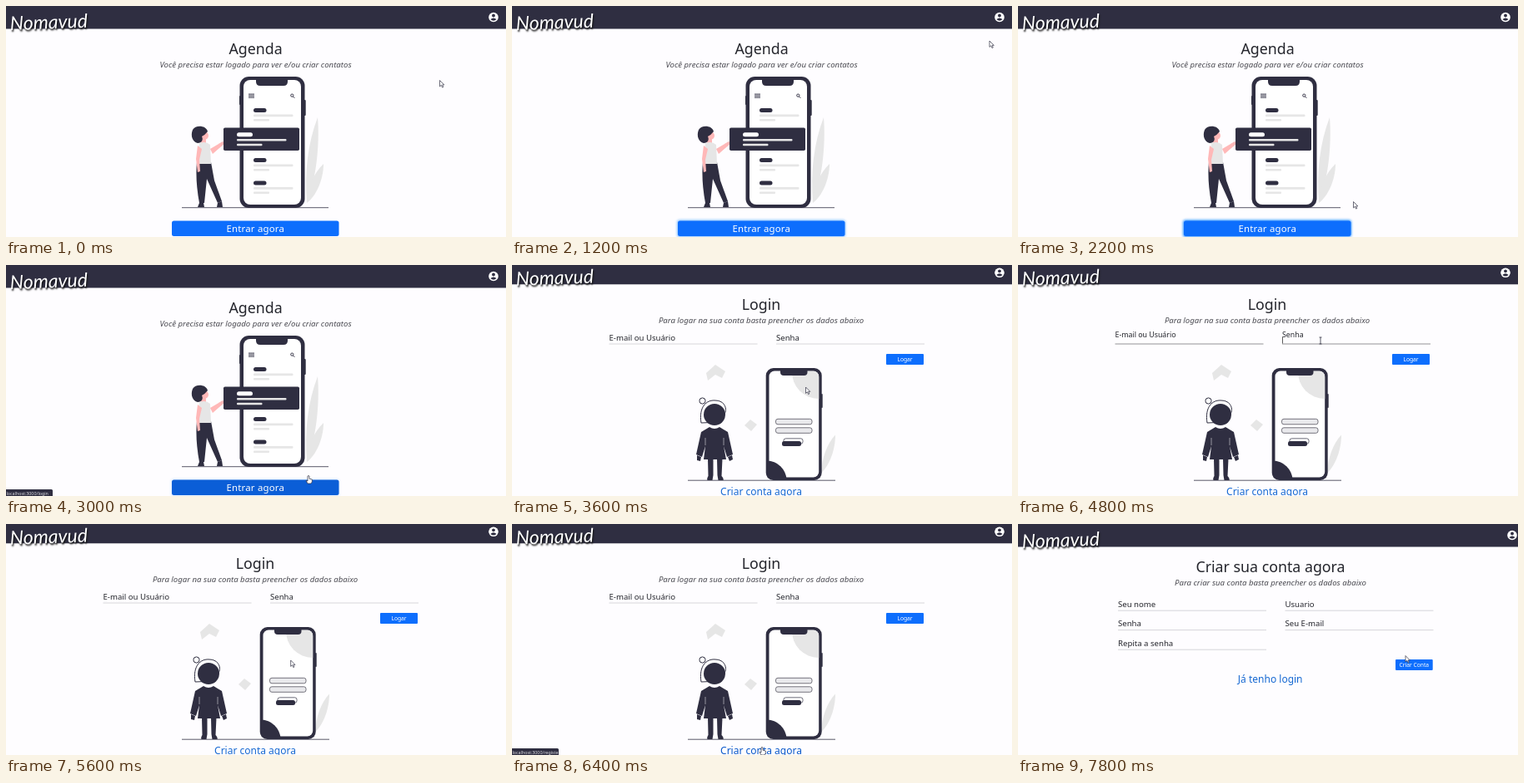
Recreate the animation shown at these times as an HTML page. Size 600 px wide and 278 px high, loop 8 s.

```html
<!DOCTYPE html>
<html lang="pt-BR">
<head>
<meta charset="utf-8">
<style>
  html, body { margin: 0; width: 100%; height: 100%; overflow: hidden; background: #fefdff; }
  svg { display: block; width: 100vw; height: 100vh; }
  text { font-family: "Noto Sans", "Open Sans", sans-serif; fill: #24252c; }
  .mid { text-anchor: middle; }
  .title { font-size: 17.8px; font-weight: 500; }
  .sub { font-size: 9.6px; font-style: italic; fill: #4b4b52; }
  .label { font-size: 9.6px; }
  .link { font-size: 12px; fill: #1769d2; }
  .small { font-size: 6.7px; fill: #fff; }
  .logo { font: italic 23px Lato, sans-serif; fill: #fff; text-shadow: 1px 2px 2px #111; }
  .dark { fill: #2f2e41; }
  .pale { fill: #e6e6e6; }
  .skin { fill: #ffb8b8; }
  .white { fill: #fff; }
  .blue { fill: #0d6efd; }
  .ink { fill: none; stroke: #2f2e41; }
</style>
</head>
<body>
<svg id="stage" viewBox="0 0 600 278" preserveAspectRatio="none"></svg>
<script>
const LOOP = 8000, STEP = 200;
const LOGIN_AT = 3400, REGISTER_AT = 7000;

const rect = (x, y, w, h, cls, r = 0) =>
  `<rect x="${x}" y="${y}" width="${w}" height="${h}" rx="${r}" class="${cls}"/>`;
const path = (d, cls, extra = '') => `<path d="${d}" class="${cls}" ${extra}/>`;
const circle = (x, y, r, cls) => `<circle cx="${x}" cy="${y}" r="${r}" class="${cls}"/>`;
const text = (x, y, cls, str, extra = '') => `<text x="${x}" y="${y}" class="${cls}" ${extra}>${str}</text>`;
const field = (id, x, y, str) =>
  `<g id="${id}">${text(x, y - 4.3, 'label', str)}` +
  `<line x1="${x}" x2="${x + 178}" y1="${y}" y2="${y}" stroke="#d2d2d6" stroke-width=".9"/></g>`;
const heading = (x, y, title, sub) =>
  text(x, y, 'title mid', title) + text(x, y + 16, 'sub mid', sub);

const leaf = (x, y) => `<g transform="translate(${x} ${y})">` +
  path('M0 0C-3-35 1-72 13-103C16-68 10-24 0 0Z', 'pale') +
  path('M0 0C1-18 8-36 20-47C20-28 11-8 0 0Z', 'pale') + '</g>';

const listItem = y => rect(297, y, 15.5, 5, 'dark', 2.5) +
  rect(297, y + 7.5, 47.5, 2.7, 'pale', 1) + rect(297, y + 13, 19, 2.5, 'pale', 1);

const woman =
  path('M229 188L246 188L250 210L259 235L254 237L241 208L238 237L232 237Q227 210 229 188Z', 'dark') +
  path('M232 237h5l1 5h-8ZM254 237l5-2l1 7h-7Z', 'dark') +
  path('M234 160h6v6h-6Z', 'skin') +
  path('M232 165Q240 162 245 167L246 190H229Q231 177 232 165Z', 'pale') +
  path('M230 168L228 184L230 200L233 199L232 185L235 172Z', 'skin') +
  path('M245 172L260 163L263 165L248 178Z', 'skin') +
  circle(238, 156, 5, 'skin') +
  path('M242 151C240 143 227 143 224 149C221 156 224 164 230 165C235 165 237 161 235 157Q239 155 242 151Z', 'dark');

const home =
  heading(299.5, 58, 'Agenda', 'Você precisa estar logado para ver e/ou criar contatos') +
  leaf(361, 237) +
  rect(357, 113, 2.7, 19, 'dark', 1) + rect(280, 108, 2, 11, 'dark', 1) +
  rect(280.5, 85, 78, 158, 'dark', 11) + rect(285, 89, 69, 150, 'white', 8) +
  path('M300 88H338V91Q338 96 333 96H305Q300 96 300 91Z', 'dark') +
  [106, 108, 110].map(y => rect(291, y - .4, 7, 1, 'dark')).join('') +
  `<circle cx="343.3" cy="107.6" r="1.6" class="ink"/>` + path('M344.5 109l1.8 1.8', 'ink') +
  [123, 183, 210.5].map(listItem).join('') +
  path('M211 242.7H387', 'ink', 'stroke-width=".8"') + woman +
  rect(261, 146.5, 91, 27.5, 'dark', 1.8) +
  rect(277, 152.3, 19, 5, 'white', 2.5) + rect(277, 160, 59.5, 2.5, 'pale', 1) +
  rect(277, 165.7, 30.5, 2.5, 'pale', 1) +
  `<rect id="glow" x="198" y="257.5" width="202" height="20.5" rx="3" fill="#0d83ff" filter="url(#blur)"/>` +
  `<rect id="enter" x="199" y="258.5" width="200.5" height="18.5" rx="2.5"/>` +
  text(299.3, 272, 'mid white', 'Entrar agora', 'style="font-size:11.4px;letter-spacing:.2px;fill:#fff"');

const girl =
  path('M227 190C224 171 233 162 244 163C253 163 258 170 256 177L251 189Z', 'white ink',
    'style="fill:#fff" stroke-width="1"') +
  `<circle cx="228.5" cy="163.5" r="3.6" fill="#fff" stroke="#2f2e41"/>` +
  circle(243, 180, 13, 'dark') +
  path('M237 195Q243 199 249 195L259 201L265 228L258 231L254 218L257 234H230L232 218L228 231L221 228L227 201Z', 'dark') +
  path('M222 229l5 2l-1 5l-4-1ZM259 231l5-2l1 5l-4 2Z', 'dark') +
  path('M235 233h6.5v20l-1 6h-6q-1-2 1-5ZM246 233h6.5l-1 21q3 3 2 5h-6l-1-6Z', 'dark') +
  path('M232 208v9M254 208v9', '', 'stroke="#fff" stroke-width=".5"');

const login =
  heading(299, 53.7, 'Login', 'Para logar na sua conta basta preencher os dados abaixo') +
  field('email', 116.5, 95, 'E-mail ou Usuário') + field('pass', 317, 95, 'Senha') +
  `<path id="caret" d="M317.5 86.5v8" stroke="#333" stroke-width=".8"/>` +
  rect(449, 107, 45, 13, 'blue', 1) + text(471.5, 116, 'small mid', 'Logar') +
  path('M233 130L244 120L256 128L252 136L244 132L235 139Z', 'pale') +
  path('M279 193L286 186L294 192L287 200Z', 'pale') +
  `<g transform="translate(371 250) scale(.85 .97)">${path('M0 0C1-18 8-36 20-47C20-28 11-8 0 0Z', 'pale')}</g>` +
  rect(371, 155, 1.7, 17, 'dark', .8) +
  rect(304.7, 124, 67, 135, 'dark', 9) + rect(308.5, 127.5, 59.7, 128, 'white', 6.5) +
  path('M336 128H361Q368.2 128 368.2 135V161A32 32 0 0 1 336 128Z', 'pale') +
  path('M322 127H354.5V129Q354.5 133 350.5 133H326Q322 133 322 129Z', 'dark') +
  path('M306 235.5A24 24 0 0 1 329.5 258H312Q306 258 306 250Z', 'dark') +
  [185.3, 195.8].map(y => `<rect x="316.5" y="${y}" width="43.5" height="6.5" rx="2.5" fill="#e9e9ec" stroke="#55545f" stroke-width=".8"/>`).join('') +
  rect(324, 212, 23, 6, 'dark', 2.5) +
  `<rect x="326" y="208.8" width="23" height="6.4" rx="2.5" class="ink" stroke-width=".7"/>` +
  path('M211 259.2H388', 'ink', 'stroke-width=".8"') + girl +
  text(299, 277, 'link mid', 'Criar conta agora', 'id="signup"');

const register =
  heading(303, 58, 'Criar sua conta agora', 'Para criar sua conta basta preencher os dados abaixo') +
  field('r1', 120, 104.2, 'Seu nome') + field('r2', 320.5, 104.2, 'Usuario') +
  field('r3', 120, 127.6, 'Senha') + field('r4', 320.5, 127.6, 'Seu E-mail') +
  field('r5', 120, 151.2, 'Repita a senha') +
  rect(453, 163, 44.7, 13, 'blue', 1) + text(475.3, 172, 'small mid', 'Criar Conta') +
  text(302.7, 191, 'link mid', 'Já tenho login');

const header = rect(0, -6, 600, 33.5, 'dark') +
  text(5, 29, 'logo', 'Nomavud', 'transform="rotate(-2 5 29)"') +
  `<g id="account">${circle(0, 0, 5.8, 'white')}${circle(0, -2, 1.9, 'dark')}` +
  `${path('M-3.6 2.6Q0-.8 3.6 2.6Q0 6 -3.6 2.6Z', 'dark')}</g>`;

const pointers = {
  arrow: path('M0 0V7.4L1.8 5.8L3.1 8.6L4.3 8L3.1 5.4H5.3Z', 'white ink', 'style="fill:#fff" stroke-width=".7"'),
  beam: path('M-1.5-4H1.5M0-4V4M-1.5 4H1.5', 'ink', 'stroke-width=".8"'),
  hand: path('M-1 0Q0-1 1 0V3.2L4.3 4V7L3 9H-1L-3 5.5L-1 6Z', 'white ink', 'style="fill:#fff" stroke-width=".7"')
};

const group = (id, body) => `<g id="${id}">${body}</g>`;
stage.innerHTML =
  '<defs><filter id="blur" x="-10%" y="-60%" width="120%" height="220%"><feGaussianBlur stdDeviation="1.8"/></filter></defs>' +
  rect(0, 0, 600, 278, '', 0).replace('class=""', 'fill="#fefdff"') +
  group('home', home) + group('login', login) + group('register', register) + group('header', header) +
  group('status', rect(-2, 270, 58, 10, 'dark', 1.5) + text(.5, 276.8, '', '', 'style="font-size:5.3px;fill:#dcdce2"')) +
  group('pointer', Object.entries(pointers).map(([id, body]) => group(id, body)).join(''));

const $ = id => document.getElementById(id);
const show = (id, on) => $(id).setAttribute('display', on ? 'inline' : 'none');
const clamp = v => Math.max(0, Math.min(1, v));
// Rises to 1 over one step before `from`, falls back over two steps after `to`.
const focus = (t, from, to) => Math.min(clamp((t - from) / STEP + 1), clamp(1 - (t - to) / (2 * STEP)));

// time, x, y of the pointer tip
const route = [
  [0, 520.5, 89.5], [200, 519, 92], [400, 519, 92], [1000, 586, 14], [1400, 560, 70],
  [2200, 402.5, 235.5], [2600, 366, 257], [3000, 363, 254], [3200, 362, 256],
  [3600, 352.5, 147], [4200, 250, 91], [4400, 240, 91], [4800, 363, 91],
  [5200, 365, 92], [5800, 330, 200], [6200, 302, 268], [6400, 300, 269], [6800, 300, 269],
  [7400, 425, 120], [7600, 440, 109], [7800, 465, 158.5]
];

function pointerAt(t) {
  const i = route.findIndex(p => p[0] >= t);
  if (i < 1) return route[i < 0 ? route.length - 1 : 0].slice(1);
  const [a, b] = [route[i - 1], route[i]];
  const k = (t - a[0]) / (b[0] - a[0]);
  return [a[1] + (b[1] - a[1]) * k, a[2] + (b[2] - a[2]) * k];
}

function setField(id, f) {
  const [label, line] = $(id).children;
  label.style.fontSize = 9.6 - .8 * f + 'px';
  label.setAttribute('transform', `translate(0 ${-3.4 * f})`);
  const shade = 210 - 75 * f;
  line.setAttribute('stroke', `rgb(${shade},${shade},${shade + 4})`);
}

function draw(t) {
  const page = t < LOGIN_AT ? 'home' : t < REGISTER_AT ? 'login' : 'register';
  ['home', 'login', 'register'].forEach(id => show(id, id === page));
  $('header').setAttribute('transform', `translate(0 ${page === 'login' ? -4.2 : 0})`);
  $('account').setAttribute('transform', `translate(${page === 'register' ? 593 : 585} 13.5)`);

  const overEnter = page === 'home' && t >= 2600;
  const overSignup = page === 'login' && t >= 6200;
  $('enter').setAttribute('fill', overEnter ? '#0b5ed7' : '#0d6efd');
  $('glow').setAttribute('opacity', t < 600 ? 0 : .5 - .5 * Math.cos(t / 1600 * 2 * Math.PI));
  $('signup').style.fill = overSignup ? '#0a58ca' : '';
  $('signup').style.textDecoration = overSignup ? 'underline' : 'none';
  show('status', overEnter || overSignup);
  $('status').lastChild.textContent = 'localhost:3000/' + (overEnter ? 'login' : 'register');

  setField('email', focus(t, 4400, 4800));
  setField('pass', focus(t, 4800, 5200));
  show('caret', t >= 4800 && t < 5400);

  const [x, y] = pointerAt(t);
  const overField = page === 'login' && y > 80 && y < 96;
  const shape = overField ? 'beam' : overEnter || overSignup ? 'hand' : 'arrow';
  Object.keys(pointers).forEach(id => show(id, id === shape));
  $('pointer').setAttribute('transform', `translate(${x} ${y})`);
}

function tick() {
  const t = performance.now() % LOOP;
  draw(Math.floor(t / STEP) * STEP);
  requestAnimationFrame(tick);
}
tick();
</script>
</body>
</html>
```
